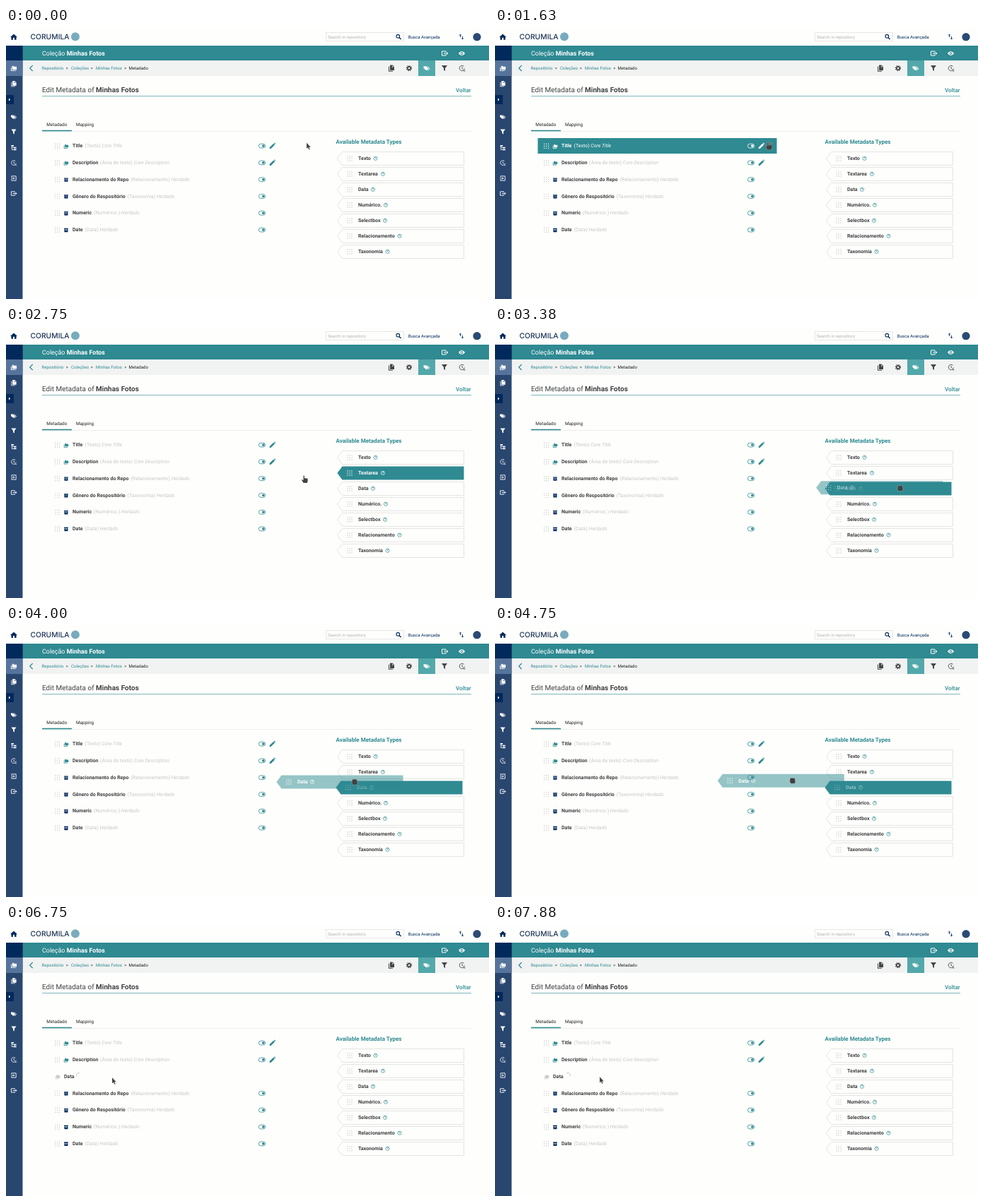
An HTML page that plays this animation: 683 by 384 pixels, repeating every 8 s.

```html
<!DOCTYPE html>
<html lang="pt">
<head>
<meta charset="utf-8">
<title>Metadata editor</title>
<style>
html, body { margin: 0; width: 100%; height: 100%; overflow: hidden; background: #fefffc; }
svg { display: block; width: 100vw; height: 100vh; font-family: Roboto, sans-serif; text-rendering: geometricPrecision; }
svg * { fill: currentColor; }
.s { fill: none; stroke: currentColor; }
.bg { fill: none; }
.edge { stroke: #e4e5e3; }
.on * { color: #fff !important; }
.on .bg { fill: #2f8a92; stroke: none; }
.drag .in { opacity: .45; }
.b { font-weight: 700; }
.m { font-weight: 500; }
.i { font-style: italic; }
</style>
</head>
<body>
<svg id="stage" viewBox="0 0 683 384"></svg>
<script>
const TEAL = '#2f8a92', NAVY = '#01295c', INK = '#3f4042', PALE = '#c6c7c6', WHITE = '#fff';

const P = d => `<path fill-rule="evenodd" d="${d}"/>`;
const S = (d, w = 1) => `<path class="s" stroke-width="${w}" d="${d}"/>`;
const ring = (r, w, extra = '') => `<circle class="s" r="${r}" stroke-width="${w}" ${extra}/>`;
const box = (x, y, w, h, c) => `<rect x="${x}" y="${y}" width="${w}" height="${h}" style="color:${c}"/>`;
const disc = (x, y, r, c) => `<circle cx="${x}" cy="${y}" r="${r}" style="color:${c}"/>`;
const text = (x, y, str, size, c = INK, cls = '') =>
  `<text x="${x}" y="${y}" font-size="${size}" class="${cls}" style="color:${c}">${str}</text>`;
const group = (id, x, y, body, attr = '') => `<g id="${id}" transform="translate(${x} ${y})" ${attr}>${body}</g>`;

const grid = [-3, 0, 3].flatMap(y => [-3, 0, 3].map(x => `M${x} ${y}h.01`)).join('');
const icons = {
  home: P('M-5 .3L0-4.2 5 .3H3.6V4H1V1H-1V4H-3.6V.3Z'),
  folders: P('M-2.5-3.5H-.5L.5-2.5H4.5V2.5H-2.5ZM-4.5-1.5H-3.5V3.5H3V4.5H-4.5Z'),
  copies: P('M-4-2.5H-3V3.8H2V4.8H-4ZM-2-4.5H1.5L4-2V3H-2ZM1-3.6V-1.4H3.2Z'),
  gear: ring(2.2, 1.7) + ring(3.5, 1.3, 'stroke-dasharray="1.4 1.35"'),
  tag: P('M-4.5-2.8H-1L2.5.5-.5 3.3-4.5 0ZM0-2.8H1L4.5.5 1.5 3.5 1 3 3.4.5Z'),
  filter: P('M-4-4H4L1 0V4L-1 2.6V0Z'),
  tree: P('M-4-4H0V-2H-4ZM0-.9H4V1.1H0ZM0 2.3H4V4.3H0ZM-3.5-2H-2.6V-.3H0V.5H-2.6V2.9H0V3.7H-3.5Z'),
  clock: S('M3.6.5A3.7 3.7 0 1 1 2.5-2.7M0-2V.3L1.6 1.3M2 3.8H4.5', .9),
  enter: S('M-3.5-1.5V-3.5H3.5V3.5H-3.5V1.5M-4 0H1M-.6-1.6L1 0-.6 1.6'),
  exit: S('M1.5-1.5V-3H-4V3H1.5V1.5M-1.5 0H4.4M2.8-1.7L4.5 0 2.8 1.7'),
  eye: P('M-4.6 0Q0-6 4.6 0Q0 6-4.6 0ZM-1.9 0a1.9 1.9 0 1 0 3.8 0a1.9 1.9 0 1 0-3.8 0') + '<circle r="1"/>',
  search: ring(2.3, 1.1, 'cx="-.7" cy="-.7"') + S('M1 1L3.6 3.6', 1.4),
  swap: S('M-1.5 .5V-3.5M-3-2L-1.5-3.5 0-2M1.5-.5V3.5M0 2L1.5 3.5 3 2', .9),
  back: S('M2-4L-2 0 2 4', 1.2),
  pencil: P('M-4 4V2L1.8-3.8 3.8-1.8-2 4ZM2.4-4.3L3-4.8Q3.4-5 3.8-4.7L4.8-3.7V-3.2L4.3-2.4Z'),
  help: ring(2.6, .7) + '<text y="1.5" font-size="4.4" class="b" text-anchor="middle">?</text>',
  crate: P('M-3.2-3H3.2V-1.4H-3.2ZM-2.8-.9H2.8V3H-2.8ZM-1-.2V.6H1V-.2Z'),
  toggle: '<rect class="s" x="-4.6" y="-2.9" width="9.2" height="5.8" rx="2.9" stroke-width=".8"/><circle cx="1.8" r="1.8"/>',
  dots: `<path class="s" stroke-width="1.4" stroke-linecap="round" d="${grid}"/>`
};
const icon = (name, x, y, c, k = 1) =>
  `<g transform="translate(${x} ${y}) scale(${k})" style="color:${c}">${icons[name]}</g>`;

const rows = [
  ['Title', 111.5, '(Texto)', 'Core Title'],
  ['Description', 133, '(Área de texto)', 'Core Description'],
  ['Relacionamento do Repo', 176.7, '(Relacionamento)', 'Herdado'],
  ['Gênero do Respositório', 171.7, '(Taxonomia)', 'Herdado'],
  ['Numeric', 124, '(Numérico.)', 'Herdado'],
  ['Date', 111.5, '(Data)', 'Herdado']
];
const tags = [['Texto', 522.5], ['Textarea', 533], ['Data', 519], ['Numérico.', 537],
  ['Selectbox', 536], ['Relacionamento', 556.5], ['Taxonomia', 539.5]];

const rowY = i => 167 + 23.8 * i;
const row = ([name, x, type, kind], i) => group('row' + i, 0, rowY(i),
  '<rect class="bg" x="60.5" y="-11" width="338" height="22"/>' +
  icon('dots', 72.7, .2, PALE) +
  (i < 2 ? icon('folders', 85, .5, TEAL, .72) : icon('crate', 85, .5, NAVY, .9)) +
  text(94, 2.2, name, 7.1, INK, 'b') +
  text(x, 2.2, `${type} <tspan class="i">${kind}</tspan>`, 7, PALE) +
  icon('toggle', 362, .1, TEAL) + (i < 2 ? icon('pencil', 376.5, .3, TEAL, .95) : ''));

const tagBody = ([name, help]) =>
  '<path class="bg edge" d="M7.5 .5H179.5V19.5H7.5L.5 10Z"/><g class="in">' +
  icon('dots', 18, 10, PALE) + text(30, 12.4, name, 7.1, INK, 'b') +
  icon('help', help - 468, 9.8, TEAL) + '</g>';

const crumbs = [[50.5, 'Repositório'], [92, 'Coleções'], [127, 'Minhas Fotos'], [173.5, 'Metadado']];
const side = [['folders', 57], ['copies', 79], ['tag', 126], ['filter', 147], ['tree', 169.5],
  ['clock', 191], ['enter', 213], ['exit', 234.5]];
const tabs = [['copies', 545], ['gear', 570], ['tag', 595], ['filter', 620], ['clock', 645]];

const chrome =
  box(0, 25, 683, 21, TEAL) + box(23, 46, 660, 22, '#f1f2f2') + box(583, 46, 24, 22, '#52a8aa') +
  box(0, 25, 23.5, 359, '#29466f') + box(0, 25, 23.5, 21, NAVY) + box(0, 46, 23.5, 22, '#56749b') +
  box(0, 95, 11, 13, NAVY) + `<path d="M4 99.5L6.2 101.5 4 103.5Z" style="color:#fff"/>` +
  icon('home', 11, 12.7, NAVY) + side.map(([n, y]) => icon(n, 11, y, WHITE, .9)).join('') +
  text(34.5, 16.2, 'CORUMILA', 10.3, '#1d3357', 'm').replace('<text', '<text font-family="Inter, sans-serif"') +
  disc(98, 12.2, 6, '#78abbd') +
  `<rect class="s" x="452.5" y="6.5" width="110" height="12" stroke-width=".8" style="color:#e2e3e2"/>` +
  text(455, 14.6, 'Search in repository', 6.1, '#b3b4b4') + icon('search', 555, 12.4, NAVY) +
  text(568.7, 14.7, 'Busca Avançada', 6.1, NAVY) + icon('swap', 644, 12.5, NAVY) + disc(666, 12.7, 5.6, '#2b4a75') +
  text(51, 39, 'Coleção <tspan class="b">Minhas Fotos</tspan>', 8.95, WHITE) +
  icon('exit', 620.5, 36, WHITE) + icon('eye', 644.5, 36, WHITE) +
  icon('back', 35.7, 57, TEAL) +
  crumbs.map(([x, s], i) => text(x, 59.2, s, 6.1, i < 3 ? TEAL : '#222')).join('') +
  [84.7, 119.8, 167.3].map(x => text(x, 59.2, '&gt;', 6.1, '#222')).join('') +
  tabs.map(([n, x]) => icon(n, x, 57, n == 'tag' ? WHITE : '#454647')).join('') +
  text(51, 91, 'Edit Metadata of <tspan class="b">Minhas Fotos</tspan>', 10) +
  text(636, 91.3, 'Voltar', 8.1, TEAL, 'm') + box(51, 96.1, 607, .8, '#5fa5aa') +
  text(57.3, 138.7, 'Metadado', 6.45, '#222') + text(99, 138.7, 'Mapping', 6.45, '#222') +
  box(51, 146, 607, .8, '#e9eae9') + box(51, 144.7, 42, 1.6, TEAL) +
  text(466.5, 164, 'Available Metadata Types', 8.05, TEAL, 'b');

const slot = `<g id="slot"><rect class="s" x="60.5" y="204.5" width="338" height="19" stroke-width=".8"
  stroke-dasharray="2 1.5" style="color:#dcdddb"/>${text(81, 217.6, 'Data', 7.1, '#555')}${icon('help', 103.5, 215.6, TEAL)}</g>`;

const fresh = `<g id="fresh">${icon('folders', 73, 215, PALE, .72)}${text(82, 217, 'Data', 7.1, INK, 'b')}
  <path id="spin" class="s" stroke-width=".8" d="M-2.5-2.5A3.6 3.6 0 0 1 2.5-2.5L3.6 0" style="color:#bfc0c0"/></g>`;

const shapes = {
  arrow: 'M0 0V8.6L2 6.9 3.4 10 4.8 9.4 3.5 6.4H6Z',
  hand: 'M-3-5.3V.5L-4.6-.8-5.2 0-2.5 5.6H3.2L4.5 1.5V-3.8H3.3V-1H2.7V-5.2H1.4V-1H.8V-6H-.6V-1H-1.2V-5.3Z',
  point: 'M-2-5.5V1L-3.6 0-4.5 .8-2 5H3.5L4.3 2V-1.2L-.5-2V-5.5Z',
  fist: 'M-3.4-3.4L-1-4 3.4-3.4 4 2 2.8 4H-2.5L-4 1Z'
};

const stage = document.getElementById('stage');
stage.innerHTML = chrome + rows.map(row).join('') +
  tags.map((t, i) => group('tag' + i, 468, 175 + 22 * i, tagBody(t))).join('') + slot + fresh +
  group('ghost', 0, 0, tagBody(tags[2]), 'class="on" opacity=".5"') +
  '<path id="cursor" style="color:#414141" stroke="#fff" stroke-opacity=".45" stroke-width=".5"/>';

const $ = id => document.getElementById(id);
const show = (id, on) => $(id).style.display = on ? '' : 'none';
const move = (id, x, y) => $(id).setAttribute('transform', `translate(${x} ${y})`);

// Key points: [step, x, y]
const cursorPath = [[11, 425, 162.5], [15, 350, 172], [18, 287, 203], [22, 422.5, 216], [26, 579, 229],
  [27, 573, 228.5], [32, 493, 221], [37, 493, 221], [41, 204, 214], [44, 204, 214], [45, 200, 210],
  [48, 165, 214], [54, 150, 216], [57, 152, 230], [60, 152, 229], [63, 148, 215]];
const ghostPath = [[26, 468, 219], [32, 382, 211], [37, 382, 211], [41, 111, 204]];

function along(path, s) {
  const n = path.findIndex(p => p[0] >= s);
  if (n < 0) return path[path.length - 1].slice(1);
  if (n == 0) return path[0].slice(1);
  const [a, b] = [path[n - 1], path[n]], k = (s - a[0]) / (b[0] - a[0]);
  return [a[1] + (b[1] - a[1]) * k, a[2] + (b[2] - a[2]) * k];
}

function draw(s) {
  const within = (a, b) => s >= a && s <= b;
  const hot = within(13, 15) ? 0 : within(16, 20) ? 1 : within(56, 60) ? 2 : -1;
  const shift = s < 39 ? 0 : s < 46 ? 22 : 23.8;
  rows.forEach((_, i) => {
    move('row' + i, 0, rowY(i) + (i > 1 ? shift : 0));
    $('row' + i).classList.toggle('on', i == hot);
  });

  const dragging = within(27, 38);
  $('tag1').classList.toggle('on', within(22, 25));
  $('tag2').classList.toggle('on', within(26, 38));
  $('tag2').classList.toggle('drag', dragging);
  move('tag2', dragging ? 466 : 468, 219);

  show('slot', within(39, 45));
  show('ghost', within(27, 45));
  move('ghost', ...along(ghostPath, s));
  show('fresh', s > 45);
  $('spin').setAttribute('transform', `translate(103 213) rotate(${(s - 54) * 90 - 70})`);

  const kind = hot >= 0 ? 'hand' : within(21, 26) ? 'point' : within(27, 44) ? 'fist' : 'arrow';
  $('cursor').setAttribute('d', shapes[kind]);
  move('cursor', ...along(cursorPath, s));
}

// The screen refreshes eight times a second
let last = -1;
function tick() {
  const s = Math.floor(performance.now() % 8000 / 125);
  if (s != last) draw(last = s);
  requestAnimationFrame(tick);
}
tick();
</script>
</body>
</html>
```
